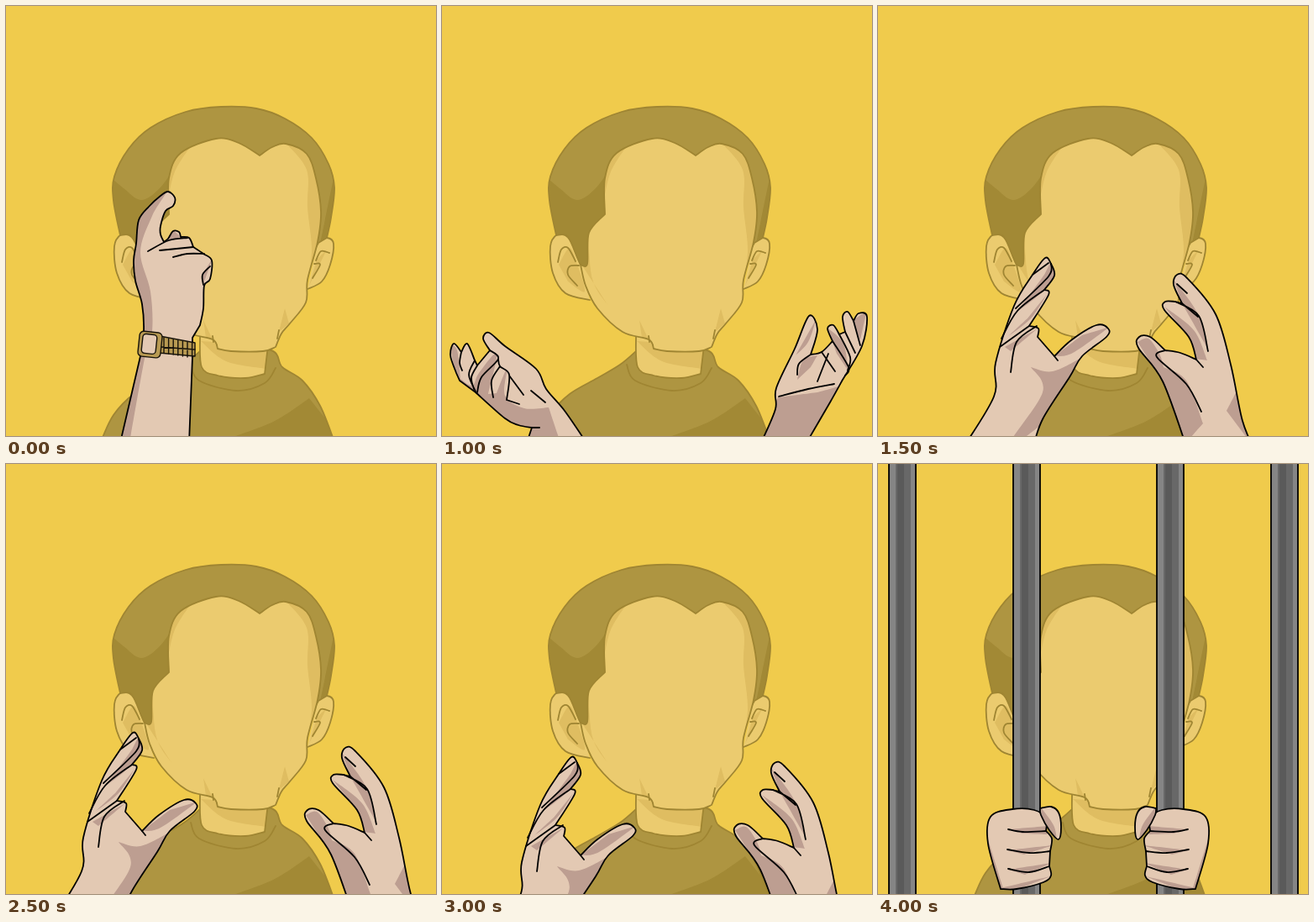
Write an HTML page that moves like this. It is 512 px wide and 512 px high and loops after 4500 ms.

```html
<!DOCTYPE html>
<html lang="en">
<head>
<meta charset="utf-8">
<title>Gestures</title>
<style>
  html, body { margin: 0; width: 100%; height: 100%; overflow: hidden; background: #f0cb4c; }
  svg { display: block; width: 100%; height: 100%; }
  path { stroke-linecap: round; stroke-linejoin: round; }
  .edge { fill: none; stroke: #9f8532; stroke-width: 1.8; }
  .hair { fill: #ae9541; }
  .dark { fill: #a28935; }
  .face { fill: #ebcb6f; }
  .tint { fill: #dfbd61; }
  .skin { fill: #e3c9b3; }
  .shade { fill: #bd9e91; }
  .ink { fill: none; stroke: #000; stroke-width: 1.8; }
  .nail { fill: #ead5c2; stroke: #000; stroke-width: 1.4; }
  .watch { fill: #b89a52; stroke: #17130a; stroke-width: 1.4; }
  .pose { visibility: hidden; }
</style>
</head>
<body>
<svg id="stage" viewBox="0 0 512 512"></svg>
<script>
const stage = document.getElementById('stage');
const HOLD = 500;
let clipCount = 0;

// Smooth line through points; "|" makes the point before it a corner.
function smoothRun(points) {
  return points.slice(1).map((end, i) => {
    const begin = points[i], before = points[i - 1] || begin, after = points[i + 2] || end;
    const a = begin.map((v, k) => v + (end[k] - before[k]) / 6);
    const b = end.map((v, k) => v - (after[k] - begin[k]) / 6);
    return `C${a} ${b} ${end}`;
  }).join('');
}

function smoothLine(text) {
  let last = null, d = '';
  for (const run of text.split('|')) {
    const points = run.trim().split(/\s+/).map(p => p.split(',').map(Number));
    if (last) points.unshift(last);
    else d = 'M' + points[0];
    d += smoothRun(points);
    last = points[points.length - 1];
  }
  return d;
}

const curve = text => text.split(';').map(smoothLine).join('');
const path = (kind, text) => `<path class="${kind}" d="${curve(text)}"/>`;
const ink = text => path('ink', text);
const edge = text => path('edge', text);
const group = (transform, content) => `<g transform="${transform}">${content}</g>`;
const shift = (x, y, content) => group(`translate(${x} ${y})`, content);

// A filled outline with shading kept inside it.
function shape(fill, shadow, line, outline, shading) {
  const id = 'clip' + clipCount++;
  return `<clipPath id="${id}"><path d="${curve(outline)}"/></clipPath>` + path(fill, outline) +
    `<g clip-path="url(#${id})">${path(shadow, shading)}</g>` + path(line, outline);
}
const limb = (outline, shading) => shape('skin', 'shade', 'ink', outline, shading);
const cloth = (outline, shading) => shape('hair', 'dark', 'edge', outline, shading);
const flesh = (outline, shading) => shape('face', 'tint', 'edge', outline, shading);

function drawBody() {
  const shirt = cloth(
    '114,516 128,487 152,462 185,443 212,427 231,411 | 312,409 329,430 353,446 374,476 390,516',
    '268,514 320,494 361,467 | 400,516');
  const collar = edge('220,427 230,446 274,458 308,449 321,431');
  const neck = flesh(
    '231,391 | 233,430 252,440 285,443 308,438 | 312,404',
    '232,399 262,423 310,432 | 314,404');
  return shirt + collar + neck;
}

function drawEars() {
  const left = flesh(
    '165,308 157,286 147,273 137,272 129,286 132,318 147,342 176,350',
    '139,308 152,288 161,307 | 170,340 150,328');
  const leftFolds = edge('138,305 142,290 150,288 159,304; 163,309 152,310 150,320 161,333');
  const right = flesh(
    '371,281 382,276 390,283 386,308 376,328 359,337',
    '370,302 382,290 | 361,333');
  const rightFolds = edge('369,303 375,292 385,294; 367,307 374,308 365,324');
  return left + leftFolds + right + rightFolds;
}

function drawHead() {
  const hair = cloth(
    `136,273 128,232 129,203 146,170 172,145 214,126 256,120 298,122 332,134 364,157 384,188
     391,216 387,252 382,276 | 372,282 | 340,340 | 174,308 | 165,308 150,275 136,273`,
    '120,200 140,217 161,231 183,217 202,190 | 210,320 | 130,320; 391,200 374,283 | 400,283');
  const face = flesh(
    `194,248 194,205 208,175 250,158 277,163 302,178 | 317,168 333,164 358,176 369,205 375,245
     371,281 359,326 357,353 338,378 328,390 321,406 | 306,411 268,411 252,408 | 246,397 215,388
     185,360 171,333 165,308 | 173,307 175,270 194,248`,
    `333,163 358,195 359,240 364,292 357,335 | 385,270 | 375,180; 190,250 200,200 222,164 | 188,170;
     174,265 179,325 198,357 | 165,306; 235,374 | 246,397 | 238,395; 332,360 | 325,388 | 337,378`);
  const creases = edge('246,393 247,400; 325,386 323,396');
  return hair + face + creases;
}

function drawWatch() {
  let links = '';
  for (let i = 0; i < 7; i++) links += `M${188 + i * 5.6} ${395 + i}v18`;
  return `<g class="watch">
    <path d="M183 393L225 401V417L182 413Z"/>
    <path fill="none" d="${links}M185 406L225 409"/>
    <g transform="rotate(6 171 403)">
      <rect x="158" y="388" width="27" height="30" rx="5"/>
      <rect class="skin" x="162" y="391" width="17" height="23" rx="4"/>
    </g></g>`;
}

function drawPointing() {
  const hand = limb(
    `136,520 160,417 | 164,388 162,355 154,327 152,303 155,283 158,255 170,239 184,226 193,221
     201,228 199,238 190,244 184,262 184,272 188,281 | 193,277 199,268 206,269 208,275 | 218,276
     223,287 | 235,295 245,303 243,325 236,333 235,360 231,380 | 222,395 | 222,418 | 218,520`,
    `154,256 | 190,222 174,250 160,293 172,340 174,388 165,420 147,520 | 130,520 | 145,320;
     192,280 197,267 208,275; 234,320 | 246,300 | 234,334`);
  const knuckles = ink(`169,292 194,279 216,276; 183,291 203,289 223,287;
    199,299 216,295 236,295; 235,332 234,320 243,310`);
  return hand + knuckles + drawWatch();
}

function drawRaisedLeft() {
  const hand = limb(
    `101,520 107,502 | 91,499 75,491 40,460 | 21,446 | 17,437 | 10,416 14,402 23,412 |
     30,402 39,422 | 42,428 | 57,410 | 49,396 56,389 75,405 112,432 124,456 146,482 172,520`,
    `9,402 18,410 22,444 | 36,452 44,437 65,414 55,462 | 65,461 | 77,433 75,464 98,479 127,478 |
     141,520 | 95,520 | 20,460`);
  const folds = ink(`23,412 21,425 24,434; 39,422 32,439 40,459; 42,428 35,442 38,456;
    57,410 67,420 47,442 42,460; 67,420 | 69,429 80,439 77,469; 69,429 59,446 61,466;
    80,440 97,463; 77,469 92,474; 107,502 116,502; 106,458 123,472`);
  return hand + folds;
}

function drawRaisedRight() {
  const hand = limb(
    `380,520 397,480 398,455 420,408 437,369 447,385 439,415 | 452,412 465,399 | 459,384 466,380
     473,391 | 480,388 | 477,370 483,364 490,375 | 496,366 506,370 500,405 477,445 | 462,472 434,520`,
    `446,372 436,400 421,416; 400,466 447,460 | 480,451 | 450,520 | 370,520;
     423,445 430,422 447,416 | 439,430; 459,383 478,402 483,433 | 470,414; 489,375 | 506,362 | 498,398`);
  const folds = ink(`473,391 486,418 483,434; 480,388 492,413; 490,375 498,404;
    465,399 484,430 480,440; 452,412 468,435; 439,415 425,426 423,439; 460,414 447,447;
    401,465 436,456 467,450`);
  return hand + folds;
}

function drawFlat() {
  const nail = (x, y, angle) => group(`translate(${x} ${y}) rotate(${angle})`,
    '<rect class="nail" x="-4.5" y="-6" width="9" height="12" rx="3.5"/>');
  const hand = limb(
    `118,520 157,462 185,443 | 197,415 210,390 218,384 225,390 207,438 | 214,441 245,403 258,401
     263,409 247,432 224,457 | 229,456 262,426 272,427 274,435 229,474 | 268,469 277,476 240,491 205,520`,
    `118,520 157,462 | 170,453 136,520; 224,389 204,440 | 211,442 228,390; 263,408 221,454 | 230,457;
     276,431 226,473 | 235,476; 239,486 270,480 | 242,493 | 204,520`);
  const gaps = ink('207,438 203,442; 224,457 221,459; 229,474 226,475');
  return hand + gaps + nail(216, 392, 20) + nail(253, 408, 35) + nail(267, 432, 48) + nail(270, 476, 78);
}

function drawFrameLeft() {
  const hand = limb(
    `52,548 90,485 92,445 114,377 136,340 151,320 158,327 162,341 150,358 | 155,364 132,401 |
     143,404 142,414 | 162,437 | 182,418 212,400 226,404 224,414 195,437 180,462 148,512 136,548`,
    `157,326 165,332 150,358 118,384 | 150,340; 154,362 134,392 106,414 | 130,392;
     142,404 110,431 | 103,426; 228,402 184,433 162,437 | 195,412;
     134,450 160,455 196,438 | 145,520 | 106,545 148,480 134,450`);
  const folds = ink(`158,327 155,342 116,380; 155,326 136,340; 150,358 118,383 99,416;
    132,401 97,426; 141,401 117,420 110,456; 162,437 166,442`);
  return hand + folds;
}

function drawFrameRight() {
  const hand = limb(
    `417,548 387,465 358,425 359,412 372,412 390,428 | 408,431 427,439 | 418,412 389,380 390,370
     402,370 | 410,372 | 400,350 404,338 416,342 450,385 468,445 482,512 497,548`,
    `357,418 | 370,414 383,432 388,448 | 415,464 435,515 | 413,540 | 387,465;
     389,376 424,404 440,440 | 426,438 | 418,412; 400,344 428,383 440,425 | 410,372;
     463,500 477,473 | 493,540`);
  const folds = ink(`390,428 380,436 415,468 433,501; 402,370 430,387 441,429; 410,372 429,388;
    427,439 435,448; 404,349 416,360`);
  return hand + folds;
}

const frameHands = (leftX, leftY, rightX, rightY) =>
  shift(leftX, leftY, drawFrameLeft()) + shift(rightX, rightY, drawFrameRight());

function drawShrugLeft() {
  const hand = limb(
    `142,520 134,485 122,455 92,420 82,395 98,397 112,408 140,428 172,446 197,465 207,488 210,520`,
    `80,393 104,408 130,443 | 123,458 | 86,420; 125,457 153,469 174,495 | 188,520 | 138,520`);
  const folds = ink(`145,451 159,466 174,480 173,502 182,512; 159,466 188,476 204,512;
    164,466 195,466; 188,476 207,488; 172,497 170,512`);
  return hand + folds;
}

function drawShrugRight() {
  const hand = limb(
    `341,520 349,477 356,450 395,423 437,417 470,407 470,420 432,442 | 444,454 473,475 472,488 |
     472,499 460,499 | 452,503 435,497 | 420,490 | 422,499 412,498 396,491 | 395,520`,
    `375,435 440,431 | 474,409 433,443; 350,487 399,490 | 395,520 | 335,520;
     400,474 440,493 | 435,499 | 399,483; 420,466 471,489 | 449,482`);
  const folds = ink(`432,442 418,436; 400,467 430,480 453,491 455,501; 406,457 435,466 472,488;
    418,461 436,449; 383,475 421,491; 350,487 397,491`);
  return hand + folds;
}

function drawFist() {
  const fingers = limb(
    `146,506 131,452 134,420 160,411 186,412 200,422 200,437 | 207,446 205,461 | 204,479 |
     206,490 197,498 165,506 146,506`,
    `155,435 203,431 | 201,441 | 172,440; 154,460 209,454 | 174,465; 155,483 207,475 | 175,489;
     146,505 205,491 | 148,514; 131,447 152,515 | 139,500`);
  const folds = ink('155,435 172,438 200,437; 154,459 180,463 205,461; 155,482 180,486 204,479');
  const thumb = limb(
    '193,410 206,408 215,415 218,432 215,447 204,436 194,418 193,410',
    '194,409 209,430 213,447 | 195,421');
  return fingers + folds + thumb;
}

function drawPrison() {
  const strip = (x, width, look) => `<rect x="${x}" y="-4" width="${width}" height="520" ${look}/>`;
  const bar = x => strip(x, 32, 'fill="#858585"') + strip(x + 8, 18, 'fill="#686868"') +
    strip(x + 10, 8, 'fill="#5a5a5a"') + strip(x, 32, 'class="ink"');
  return [13, 161, 332, 468].map(bar).join('') + drawFist() +
    group('translate(524 0) scale(-1 1)', drawFist());
}

const poses = [
  drawPointing(),
  frameHands(-20, 7, 7, 2),
  drawRaisedLeft() + drawRaisedRight(),
  frameHands(48, -20, -48, -18),
  drawFlat(),
  frameHands(0, 0, 0, 0),
  frameHands(3, 29, -8, 18),
  drawShrugLeft() + drawShrugRight(),
  drawPrison()
];

stage.innerHTML = drawBody() + drawEars() + drawHead() +
  poses.map(pose => `<g class="pose">${pose}</g>`).join('');
const layers = [...stage.querySelectorAll('.pose')];
const start = performance.now();

function render() {
  const elapsed = Math.max(0, performance.now() - start);
  const current = Math.floor(elapsed / HOLD) % layers.length;
  layers.forEach((layer, i) => layer.style.visibility = i === current ? 'visible' : 'hidden');
  requestAnimationFrame(render);
}
render();
</script>
</body>
</html>
```
